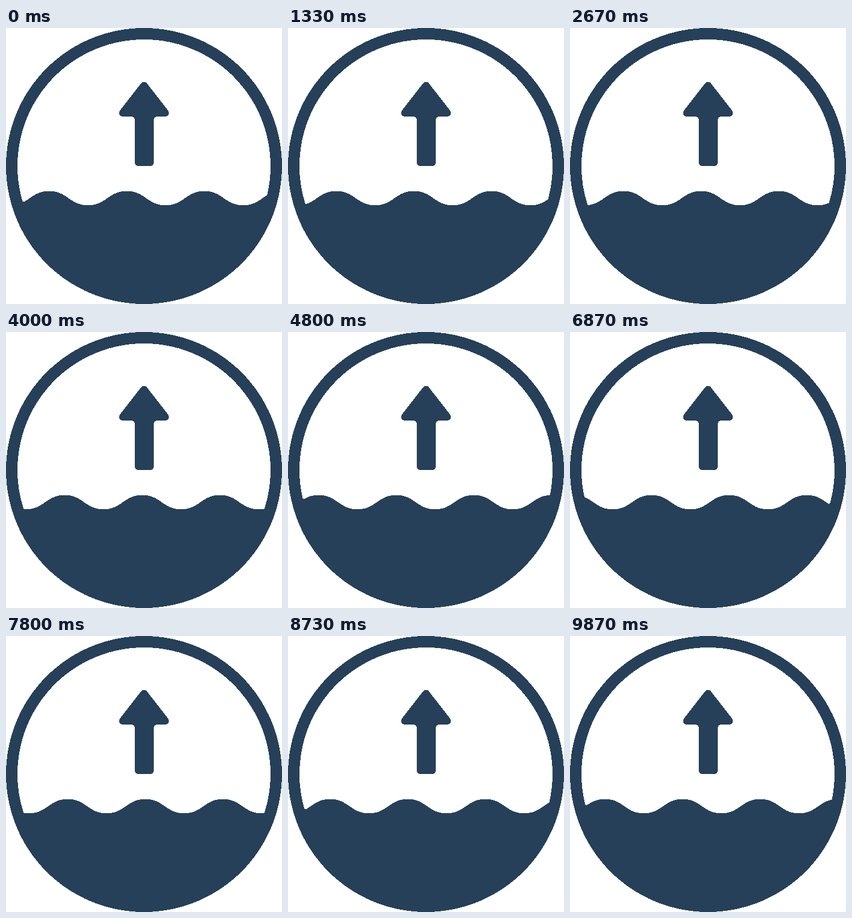
Animation, 480 px wide and 480 px high, one loop 9.94 s. Source, as an HTML page:

```html
<!DOCTYPE html>
<html lang="en">
<head>
<meta charset="utf-8">
<title>Rising water</title>
<style>
  html, body { margin: 0; width: 100%; height: 100%; overflow: hidden; background: #fff; }
  svg { display: block; width: 100vw; height: 100vh; shape-rendering: crispEdges; }
</style>
</head>
<body>
<svg viewBox="0 0 480 480">
  <circle cx="240" cy="240" r="240" fill="#264059"/>
  <path id="sky" fill="#fff" stroke="#fff" stroke-width="5" stroke-linejoin="round"/>
  <path fill="#264059" d="M235.500 95.500Q240 91.500 244.500 95.500L281.500 143Q285 148.500 281.500 152Q279 154 275 154H264Q257 154 257 161V233Q257 240 250 240H231Q224 240 224 233V161Q224 154 217 154H205Q201 154 198.500 152Q195 148.500 198.500 143Z"/>
</svg>
<script>
const LOOP = 9940, FPS = 15, LAST = 148;
const WAVE = 135, SPEED = 108, CREST = 210;
const ROUND = 2.5, R = 220 - ROUND, C = 240;
const K = 2 * Math.PI / WAVE;
const sky = document.getElementById('sky');

// Point on the water line, pushed upwards along its normal
function surface(x, crest) {
  const a = (x - crest) * K;
  const y = 296 - 12.9 * Math.cos(a) + 0.6 * Math.cos(3 * a);
  const slope = K * (12.9 * Math.sin(a) - 1.8 * Math.sin(3 * a));
  const n = ROUND / Math.hypot(1, slope);
  return [x + slope * n, y - n];
}

// Nearest point on the inner rim
function toRim([x, y]) {
  const s = R / Math.hypot(x - C, y - C);
  return [C + (x - C) * s, C + (y - C) * s];
}

function draw(ms) {
  const t = Math.floor((ms % LOOP) / 10) * 10 + 5;
  const frame = Math.min(LAST, Math.floor(t * FPS / 1000));
  const crest = CREST + SPEED * frame / FPS;
  const pts = [];
  for (let x = 15; x <= 465; x += 0.5) {
    const p = surface(x, crest);
    if (Math.hypot(p[0] - C, p[1] - C) <= R) pts.push(p);
  }
  const end = pts.length - 1;
  pts[0] = toRim(pts[0]);
  pts[end] = toRim(pts[end]);
  const line = pts.map(p => p.map(v => v.toFixed(3)).join(' '));
  sky.setAttribute('d', `M${line.join('L')}A${R} ${R} 0 1 0 ${line[0]}Z`);
}

const start = performance.now();
function tick() {
  draw(performance.now() - start);
  requestAnimationFrame(tick);
}
tick();
</script>
</body>
</html>
```
